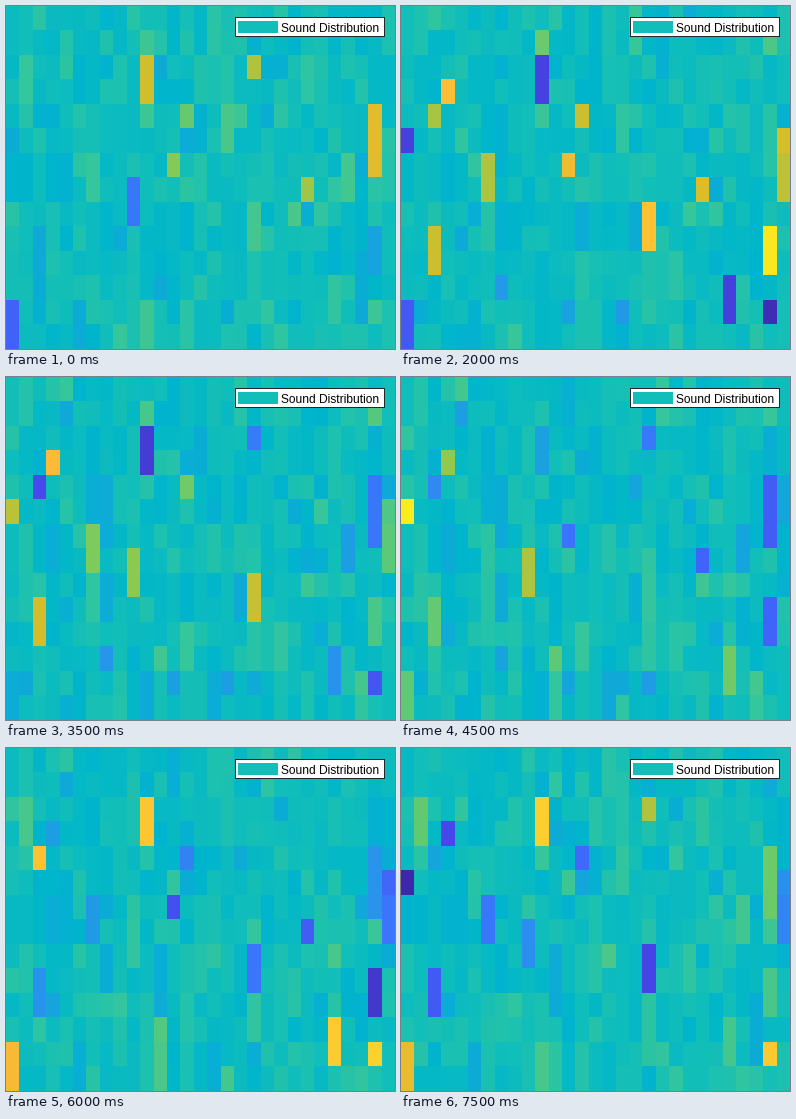
Animation of 389x343 px, one loop 8000 ms. Source, as a matplotlib script:

```python
import numpy as np
import matplotlib.pyplot as plt
from matplotlib.animation import FuncAnimation
from matplotlib.colors import LinearSegmentedColormap
from matplotlib.patches import Rectangle

W, H, DPI = 389, 343, 100
COLS, ROWS = 29, 14
FRAMES, STEP = 16, 500
REST = 0.485

PARULA = LinearSegmentedColormap.from_list("parula", [
    (0.000, (0.242, 0.150, 0.660)), (0.111, (0.280, 0.278, 0.922)),
    (0.222, (0.244, 0.436, 0.999)), (0.333, (0.154, 0.590, 0.922)),
    (0.444, (0.000, 0.712, 0.800)), (0.500, (0.070, 0.746, 0.726)),
    (0.556, (0.194, 0.776, 0.625)), (0.667, (0.504, 0.799, 0.348)),
    (0.778, (0.850, 0.742, 0.160)), (0.845, (0.996, 0.730, 0.220)),
    (0.889, (0.989, 0.800, 0.190)), (1.000, (0.977, 0.984, 0.080)),
], N=512)

# Every cell swings as a cosine; most of them only faintly.
rng = np.random.default_rng(12)
shape = (ROWS, COLS)
offset = rng.normal(0, .024, shape)
swing = np.clip(.015 + rng.exponential(.018, shape), 0, .11)
peak = rng.uniform(0, 10, shape)
period = rng.uniform(7, 11, shape)

# Some neighbours below each other move as one.
for r in range(1, ROWS, 2):
    joined = rng.random(COLS) < .4
    for part in (offset, swing, peak, period):
        part[r, joined] = part[r - 1, joined]


def source(col, row, crest, cycle, size, tall=1):
    """Make a cell, or a short stack of cells, swing strongly."""
    cells = slice(row, row + tall), col
    offset[cells] = 0
    peak[cells], period[cells], swing[cells] = crest, cycle, size


source(10, 2, 6.8, 8.0, .48, tall=2)
source(27, 9, 2.0, 7.0, .47, tall=2)
source(0, 5, 4.5, 6.2, .48)
source(27, 12, 6.7, 8.6, .48)
source(24, 11, 5.9, 7.6, .40, tall=2)
source(18, 8, 2.2, 10.5, .38, tall=2)
source(2, 4, 1.3, 4.8, .38)
source(3, 3, 2.7, 11, .40)
source(0, 12, 6.6, 11, .37, tall=2)
source(22, 7, 1.2, 8.2, .36)
source(12, 6, 1.4, 8.4, .37)
source(2, 9, 2.8, 9.6, .32, tall=2)
source(27, 4, 0.0, 9.0, .31, tall=3)
source(28, 5, 1.9, 8.6, .29)
source(28, 6, 2.0, 9.0, .26, tall=2)
source(13, 4, 1.8, 11, .28)
source(9, 7, 4.3, 8.4, .24, tall=2)
source(6, 6, 2.2, 11, .24, tall=2)
source(18, 2, 0.3, 7.5, .25)


def field(t):
    z = REST + offset + swing * np.cos(2 * np.pi * (t - peak) / period)
    return np.clip(z, 0, 1)


fig = plt.figure(figsize=(W / DPI, H / DPI), dpi=DPI)
ax = fig.add_axes([0, 0, 1, 1])
image = ax.imshow(field(0), cmap=PARULA, vmin=0, vmax=1, aspect="auto",
                  interpolation="nearest", extent=(0, W, H, 0))
ax.set(xlim=(0, W), ylim=(H, 0))
ax.axis("off")


def box(x, y, w, h, color):
    ax.add_patch(Rectangle((x, y), w, h, facecolor=color, linewidth=0,
                           zorder=3))


box(229, 11, 150, 20, "#262626")
box(230, 12, 148, 18, "white")
box(232, 15, 40, 12, "#12beb9")
ax.text(275, 26, "Sound Distribution", family="Liberation Sans",
        size=12 * 72 / DPI, color="black", va="baseline", zorder=4)


def update(i):
    image.set_data(field(i * STEP / 1000))
    return (image,)


anim = FuncAnimation(fig, update, frames=FRAMES, interval=STEP,
                     repeat=True, repeat_delay=0, blit=False)
plt.show()
```
